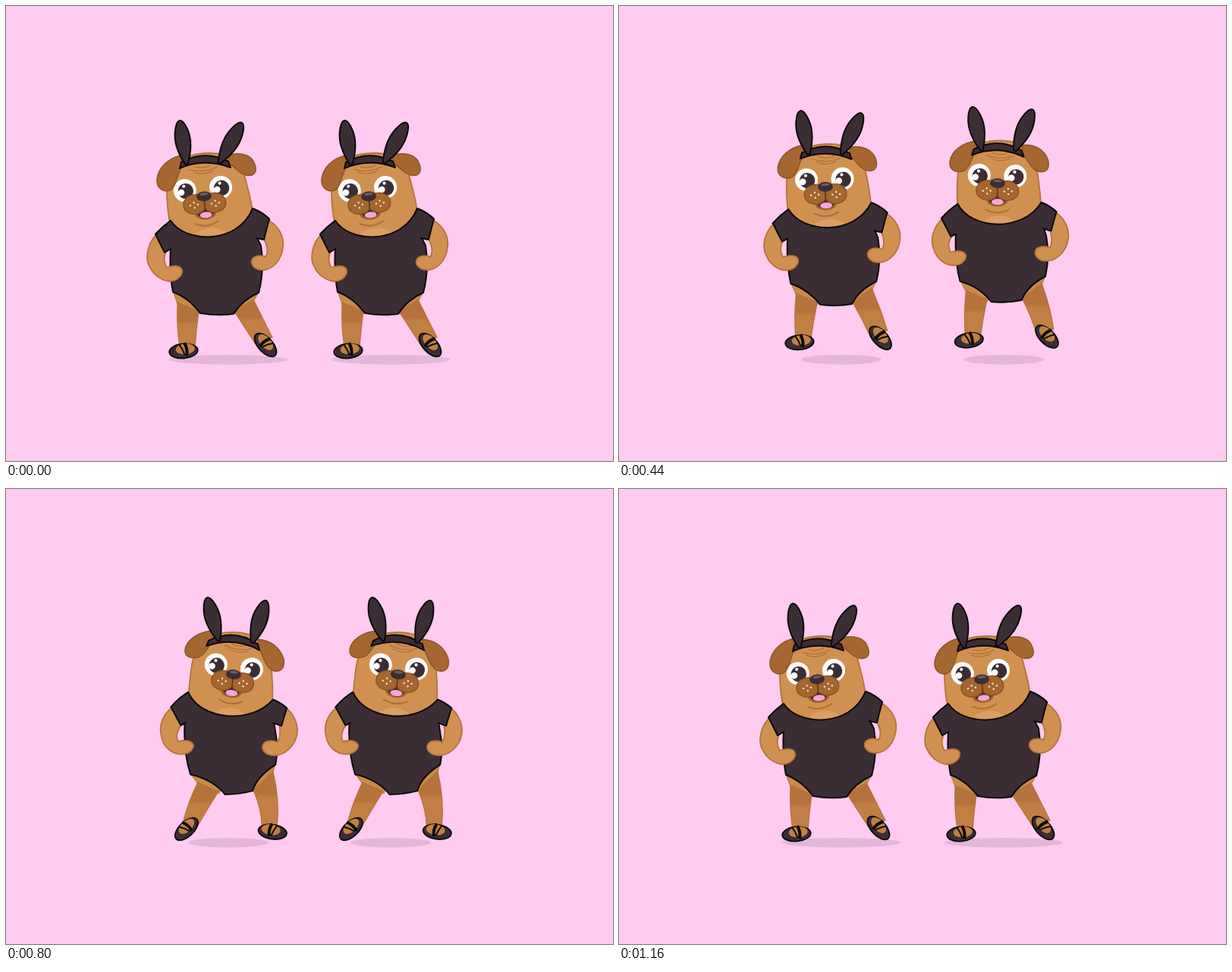
Animation, 800 px wide and 600 px high, one loop 1200 ms. Source, as an HTML page:

```html
<!DOCTYPE html>
<html lang="en">
<head>
<meta charset="utf-8">
<title>Dancing pugs</title>
<style>
  html, body { margin: 0; width: 100%; height: 100%; overflow: hidden; background: #ffcbf0; }
  svg { display: block; width: 100vw; height: 100vh; }
</style>
</head>
<body>
<svg id="stage" viewBox="0 0 800 600">
  <defs>
    <linearGradient id="leg" x1="0" y1="0" x2="0" y2="1">
      <stop offset=".4" stop-color="#b5733b"/>
      <stop offset=".48" stop-color="#c17f44"/>
    </linearGradient>
    <g id="eye">
      <circle r="15" fill="#fff"/>
      <circle cx="1" cy="1" r="10.2" fill="#3b2d34"/>
      <circle cx="-5" cy="2.5" r="4.3" fill="#fff"/>
      <circle cx="-1" cy="-5.5" r="2.1" fill="#fff"/>
    </g>
    <g id="dots" fill="#ffe9d2">
      <circle cx="-5" r="1.2"/><circle cy="-3.5" r="1.2"/>
      <circle cx="5" cy="-.5" r="1.2"/><circle cx=".5" cy="3.5" r="1.2"/>
    </g>
    <g id="shoe">
      <ellipse rx="18.8" ry="9.6" fill="#3b2d34" stroke="#0d090b" stroke-width="1.8"/>
      <ellipse cx="2.5" cy="-2.5" rx="12.5" ry="7" fill="#c17f44"/>
      <path d="M2 -10.5Q6 -2 3.5 6.5" fill="none" stroke="#0d090b" stroke-width="4"/>
      <path d="M-5 -9Q-1 -3 1 5" fill="none" stroke="#0d090b" stroke-width="2"/>
    </g>
    <g id="face">
      <g fill="none" stroke="#b0713a" stroke-width="1.3" stroke-linecap="round">
        <path d="M-16 -37Q2 -30 20 -37M-11 -33Q2 -27 15 -33M-8 -40Q2 -36 12 -40"/>
        <path d="M-15 35Q1 43 16 34" stroke-width="2.2"/>
      </g>
      <use href="#eye" x="-24.5" y="-10"/>
      <use href="#eye" x="23" y="-10"/>
      <ellipse cy="22.5" rx="13.8" ry="8.3" fill="#9a5e2b"/>
      <ellipse cy="22" rx="10.8" ry="6.3" fill="#3b2d34"/>
      <ellipse cx=".5" cy="24.6" rx="8" ry="4" fill="#f7a5d6"/>
      <g fill="#a4662f" stroke="#8a5225" stroke-width="1.3">
        <path d="M0 1C-12 -8 -28 -2 -28 10C-28 23 -8 27 0 16C8 27 28 23 28 10C28 -2 12 -8 0 1Z"/>
        <path d="M0 4V18" stroke="#5c371d" stroke-width="1.6"/>
      </g>
      <use href="#dots" x="-14" y="10.5"/>
      <use href="#dots" x="14" y="10.5"/>
      <ellipse rx="10" ry="6.4" fill="#3b2d34"/>
      <ellipse cy="-3" rx="5.5" ry="1.8" fill="#6d5a61"/>
    </g>
  </defs>
</svg>
<script>
const NS = 'http://www.w3.org/2000/svg';
const stage = document.getElementById('stage');
const STEP = 40, LOOP = 1200, HOP = 6, HEIGHT = 16;

const SKIN = { fill: '#d09150', stroke: '#b37439', 'stroke-width': 1.8 };
const EAR = { fill: '#a5672f', stroke: '#8f5727', 'stroke-width': 1.6 };
const CLOTH = { fill: '#3b2d34', stroke: '#0d090b', 'stroke-width': 2, 'stroke-linejoin': 'round' };
const LEG = { fill: 'url(#leg)', stroke: '#b37439', 'stroke-width': 1.2 };
const HIP = { fill: '#c98a4a', stroke: '#b37439', 'stroke-width': 1 };

// Each shape in the left-leaning and the right-leaning pose.
const POSES = {
  hipL: ['M220 376L226 393Q241 393 254 406L262 390Z',
         'M245 380L255 393Q270 396 283 406L288 392Z'],
  hipR: ['M333 377L326 390Q312 394 301 406L296 390Z',
         'M356 367L354 378Q338 388 328 402L320 388Z'],
  head: ['M217 290C212 270 211 240 213 228C218 202 245 194 268 194C298 194 310 205 314 222C318 240 324 255 325 275Q270 332 217 290Z',
         'M242 280C244 262 246 240 249 230C254 206 272 193 302 193C330 193 346 206 351 228C354 250 354 270 353 290Q296 335 242 280Z'],
  chest: ['M250 300Q272 285 294 300Q272 312 250 300Z',
          'M275 300Q296 285 317 301Q296 312 275 300Z'],
  earL: ['M230 197C214 201 201 213 199 228C198 240 207 246 216 243C225 238 225 222 232 211Z',
         'M276 191C258 191 241 202 239 215C238 225 248 227 258 224C267 220 268 212 277 203Z'],
  earR: ['M296 196C310 193 324 196 328 209C332 221 325 225 316 223C305 220 302 211 291 206Z',
         'M335 203C351 204 364 214 369 230C371 244 363 248 354 245C344 240 343 225 335 213Z'],
  band: ['M231 206Q262 189 293 205L296 213Q262 200 229 214Z',
         'M270 204Q304 187 335 209L337 217Q304 198 267 211Z'],
  torso: ['M217 283C235 312 305 316 325 267Q338 272 347 281L340 308L331 306L336 316Q341 348 333 378C315 386 305 398 300 406Q278 409 256 405C247 394 238 384 220 377Q215 350 217 320L209 325L197 301Q206 291 217 283Z',
          'M242 271C258 310 326 314 354 283Q364 287 372 294L365 317L355 313L356 321Q361 345 357 367C343 376 331 388 327 402Q308 407 291 407C283 396 264 384 245 381Q235 350 237 313L232 315L219 291Q229 279 242 271Z'],
  armL: ['M200 300C185 313 183 335 190 345C195 355 205 362 215 363C228 363 235 352 231 346C227 341 217 343 212 345C207 337 208 328 212 322Z',
         'M221 291C207 302 203 316 206 329C208 344 221 353 231 353C244 354 251 344 247 339C243 334 231 335 228 337C225 330 227 322 233 314Z'],
  armR: ['M345 282C360 290 367 305 365 318C363 335 352 347 340 348C327 349 321 340 325 333C330 328 340 329 342 331C346 325 345 315 339 306Z',
         'M370 293C382 302 387 316 385 329C382 344 368 356 355 356C342 356 336 347 341 340C346 335 357 337 359 339C363 334 363 324 362 315Z'],
  sleeveL: ['M217 283Q206 291 197 301L209 325L216 321', 'M242 271Q229 279 219 291L232 315L239 311'],
  sleeveR: ['M325 267Q338 272 347 281Q343 295 340 308L329 306', 'M354 283Q364 287 372 294Q368 306 365 317L354 313']
};

// Rabbit ears: base x, base y, tip x, tip y.
const RABBIT = [
  [[238, 209, 229, 151], [284, 204, 268, 147]],
  [[281, 207, 311, 154], [328, 207, 345, 151]]
];

const lerp = (a, b, f) => a + (b - a) * f;
const mixList = (a, b, f) => a.map((v, i) => lerp(v, b[i], f));
const clamp = v => Math.min(1, Math.max(0, v));
const smooth = v => { v = clamp(v); return v * v * (3 - 2 * v); };

function mixPath([a, b], f) {
  const ends = b.match(/\d+/g);
  let i = 0;
  return a.replace(/\d+/g, v => lerp(+v, +ends[i++], f).toFixed(2));
}

function add(parent, tag, attrs = {}) {
  const el = document.createElementNS(NS, tag);
  for (const key in attrs) el.setAttribute(key, attrs[key]);
  parent.append(el);
  return el;
}

function leaf([bx, by, tx, ty]) {
  const dx = tx - bx, dy = ty - by, len = Math.hypot(dx, dy);
  const at = (s, w) => `${bx + dx * s - dy / len * w} ${by + dy * s + dx / len * w}`;
  return `M${at(0, 1.5)}C${at(.22, 7.5)} ${at(.52, 12.5)} ${at(.78, 8.2)}` +
    `C${at(.92, 6)} ${at(1, 3)} ${at(1, 0)}C${at(1, -3)} ${at(.92, -6)} ${at(.78, -8.2)}` +
    `C${at(.52, -12.5)} ${at(.22, -7.5)} ${at(0, -1.5)}Z`;
}

function makeDog(x, starts) {
  const root = add(stage, 'g');
  const parts = [];
  const part = (name, style) => parts.push([add(root, 'path', style), POSES[name]]);
  part('hipL', HIP);
  part('hipR', HIP);
  const legs = [0, 1].map(() => add(root, 'path', LEG));
  const shoes = [0, 1].map(() => add(root, 'use', { href: '#shoe' }));
  part('head', SKIN);
  part('chest', { fill: '#d99f64' });
  const face = add(root, 'use', { href: '#face' });
  part('earL', EAR);
  part('earR', EAR);
  part('band', CLOTH);
  const rabbit = [0, 1].map(() => add(root, 'path', CLOTH));
  part('torso', CLOTH);
  part('armL', SKIN);
  part('armR', SKIN);
  part('sleeveL', CLOTH);
  part('sleeveR', CLOTH);
  return { x, starts, root, parts, legs, shoes, face, rabbit };
}

// Lean runs from 0 (left) to 1 (right); every second hop goes back.
function hopState(starts, n) {
  let lean = 0, lift = 0;
  starts.forEach((start, i) => {
    if (n < start) return;
    const u = clamp((n - start) / HOP);
    lean = i % 2 ? 1 - smooth(u) : smooth(u);
    lift = HEIGHT * smooth(1 - Math.abs(2 * u - 1));
  });
  return { lean, lift };
}

function drawLegs(dog, f) {
  const turn = smooth((f - .45) / .3);
  const swing = f * f * (1 - f);
  const lx = lerp(234, 232, f) + 90 * swing, ly = lerp(455, 450, f) + 35 * swing;
  const rx = lerp(342, 352, f), ry = lerp(447, 457, f);
  dog.shoes[0].setAttribute('transform', `translate(${lx} ${ly}) rotate(${lerp(-5, -44, turn)})`);
  dog.shoes[1].setAttribute('transform', `translate(${rx} ${ry}) rotate(${lerp(48, 8, turn)}) scale(-1 1)`);

  const [ox, oy, ix, iy] = mixList([226, 391, 254, 403], [255, 391, 282, 403], f);
  const [ax, ay, bx, by] = mixList([-5, -5, 15, -4], [-4, -11, 13, -1], turn);
  dog.legs[0].setAttribute('d', `M${ox} ${oy}Q${lerp(ox, lx + ax, .5) - 3} ${lerp(oy, ly + ay, .5)} ${lx + ax} ${ly + ay}` +
    `L${lx + bx} ${ly + by}Q${lerp(ix, lx + bx, .5) - 1} ${lerp(iy, ly + by, .5)} ${ix} ${iy}Z`);

  const [px, py, qx, qy] = mixList([301, 403, 326, 387], [328, 401, 354, 376], f);
  const [cx, cy, ex, ey] = mixList([-13, -1, 9, -10], [-14, -6, 6, -6], turn);
  const bulge = 7 * f;
  dog.legs[1].setAttribute('d', `M${px} ${py}Q${lerp(px, rx + cx, .5) + bulge * .8} ${lerp(py, ry + cy, .5)} ${rx + cx} ${ry + cy}` +
    `L${rx + ex} ${ry + ey}Q${lerp(qx, rx + ex, .5) + bulge} ${lerp(qy, ry + ey, .5)} ${qx} ${qy}Z`);
}

function drawDog(dog, n) {
  const { lean, lift } = hopState(dog.starts, n);
  dog.root.setAttribute('transform', `translate(${dog.x} ${-lift})`);
  dog.parts.forEach(([el, pair]) => el.setAttribute('d', mixPath(pair, lean)));
  dog.rabbit.forEach((el, i) => el.setAttribute('d', leaf(mixList(...RABBIT[i], lean))));
  dog.face.setAttribute('transform',
    `translate(${lerp(261, 303, lean)} ${lerp(251, 248.5, lean)}) rotate(${lerp(-5, 8, lean)})`);
  drawLegs(dog, lean);
}

// Step and amount of shrinking of the ground shadows.
const SHRINK = [[0, 0], [4, 1], [7, 0], [10, 1], [13, 0], [16, 0], [19, 1], [22, 0], [26, 1], [29, 0], [30, 0]];

function shrinkAt(n) {
  const i = SHRINK.findIndex(key => key[0] > n);
  const [t0, v0] = SHRINK[i - 1], [t1, v1] = SHRINK[i];
  return lerp(v0, v1, smooth((n - t0) / (t1 - t0)));
}

const shadows = [293, 507.3].map(cx => add(stage, 'ellipse', { cx, cy: 466.3, ry: 6.4, fill: '#e4b7da' }));
const dogs = [makeDog(0, [0, 7, 15, 22]), makeDog(217, [1, 8, 15, 22])];

function draw(now) {
  const n = Math.floor((now % LOOP) / STEP);
  const width = lerp(78, 44, shrinkAt(n));
  shadows.forEach(el => el.setAttribute('rx', width));
  dogs.forEach(dog => drawDog(dog, n));
}

const begin = performance.now();
function tick() {
  draw(performance.now() - begin);
  requestAnimationFrame(tick);
}
tick();
</script>
</body>
</html>
```
